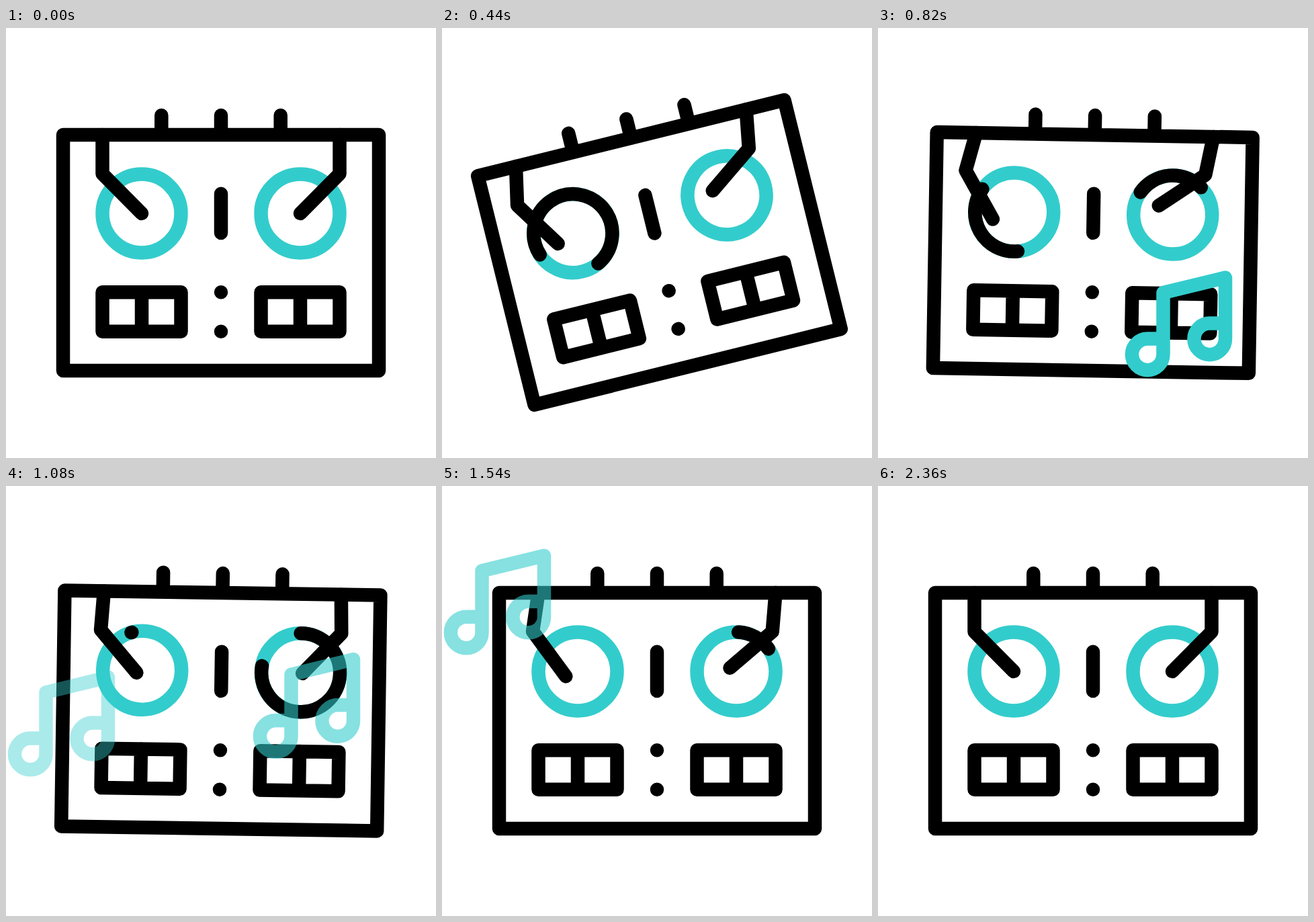
An HTML page for the animation above (2400 ms loop, 640 by 640 pixels).

```html
<!DOCTYPE html>
<html lang="en">
<head>
<meta charset="utf-8">
<title>DJ mixer</title>
<style>
html, body { margin: 0; width: 100%; height: 100%; overflow: hidden; background: #fff; }
svg { display: block; width: 100%; height: 100%; }
</style>
</head>
<body>
<svg viewBox="0 0 640 640" fill="none" stroke="#000" stroke-width="20.5" stroke-linecap="round" stroke-linejoin="round">
  <defs>
    <path id="note" d="M424.5 -57H401.2A23.3 23.3 0 1 0 424.5 -33.7V-125.5L517 -148V-56.7A23.3 23.3 0 1 1 493.7 -80H517"/>
    <path id="pads" d="M143.5 393.3H260.5V451.7H143.5ZM202 393.3V451.7"/>
  </defs>
  <g id="deck">
    <path d="M85 159H555V510H85ZM231.3 130V159M320 130V159M408.7 130V159M320 246.7V305M320 393.3h.01M320 451.7h.01"/>
    <use href="#pads"/>
    <use href="#pads" x="236"/>
    <g stroke="#33cccc">
      <circle cx="202" cy="276" r="58.5"/>
      <circle cx="438" cy="276" r="58.5"/>
    </g>
    <path id="arcL"/>
    <path id="arcR"/>
    <path id="armL" d="M143.5 159V217L202 276"/>
    <path id="armR" d="M496.5 159V217L438 276"/>
  </g>
  <use id="noteR" href="#note" stroke="#33cccc"/>
  <use id="noteL" href="#note" stroke="#33cccc"/>
</svg>
<script>
const LOOP = 2400, STEP = 20, FPS = 60;
const $ = id => document.getElementById(id);
const clamp = v => Math.max(0, Math.min(1, v));
const smooth = u => u * u * (3 - 2 * u);

// Keys are [frame, value]; each swing eases in and out.
const SWING = [[3, 0], [26, -13.9], [41, 7], [56, -4], [68.5, 2], [84, 0]];
const ARM_L = [[0, 0], [41, 17], [76, 0], [107, 16], [142, 0]];
const ARM_R = [[0, 0], [41, 14], [70, -2.5], [114, 12], [138, 0]];

// Angles of the two ends of the spinning arc.
const HEAD = [[8, 125], [16, 234], [26, 424], [32, 468], [49, 575], [59, 604], [65, 614]];
const TAIL = [[8, 125], [16, 133], [26, 161], [32, 188], [49, 444], [59, 552], [65, 613]];

function segment(keys, f) {
  let i = 0;
  while (i < keys.length - 2 && f > keys[i + 1][0]) i++;
  const [a, b] = [keys[i], keys[i + 1]];
  return [i, a, b, clamp((f - a[0]) / (b[0] - a[0]))];
}

function ease(keys, f) {
  const [, a, b, u] = segment(keys, f);
  return a[1] + (b[1] - a[1]) * smooth(u);
}

function curve(keys, f) {
  const [i, a, b, u] = segment(keys, f);
  const slope = k => {
    const p = keys[Math.max(0, k - 1)], q = keys[Math.min(keys.length - 1, k + 1)];
    return (q[1] - p[1]) / (q[0] - p[0]) * (b[0] - a[0]);
  };
  const m = i ? slope(i) : 0, n = slope(i + 1), v = 1 - u;
  return a[1] * v * v * (1 + 2 * u) + m * u * v * v + b[1] * u * u * (3 - 2 * u) - n * u * u * v;
}

function arc(id, cx, f, turn) {
  if (f <= 8 || f > 65) return $(id).setAttribute("d", "");
  const from = curve(TAIL, f) + turn, to = curve(HEAD, f) + turn;
  const at = deg => {
    const r = deg * Math.PI / 180;
    return (cx + 58.5 * Math.cos(r)).toFixed(2) + " " + (276 + 58.5 * Math.sin(r)).toFixed(2);
  };
  $(id).setAttribute("d", `M${at(from)}A58.5 58.5 0 ${to - from > 180 ? 1 : 0} 1 ${at(to)}`);
}

function note(id, x, y, rise, f) {
  const alpha = clamp(Math.min(f / 12, (39 - f) / 12));
  $(id).setAttribute("opacity", alpha);
  $(id).setAttribute("transform", `translate(${x} ${y - rise * smooth(clamp(f / 39))})`);
}

function rotate(id, deg, x, y) {
  $(id).setAttribute("transform", `rotate(${deg} ${x} ${y})`);
}

function draw(ms) {
  const f = Math.round(Math.floor(ms / STEP) * STEP * FPS / 1000);
  rotate("deck", ease(SWING, f), 320, 320);
  rotate("armL", ease(ARM_L, f), 143.5, 159);
  rotate("armR", ease(ARM_R, f), 496.5, 159);
  arc("arcL", 202, f, 0);
  arc("arcR", 438, f - 33, 81);
  note("noteR", 0, 595.5, 207, f - 33);
  note("noteL", -365, 442, 208, f - 60);
}

const start = performance.now();
function tick() {
  draw((performance.now() - start) % LOOP);
  requestAnimationFrame(tick);
}
tick();
</script>
</body>
</html>
```
